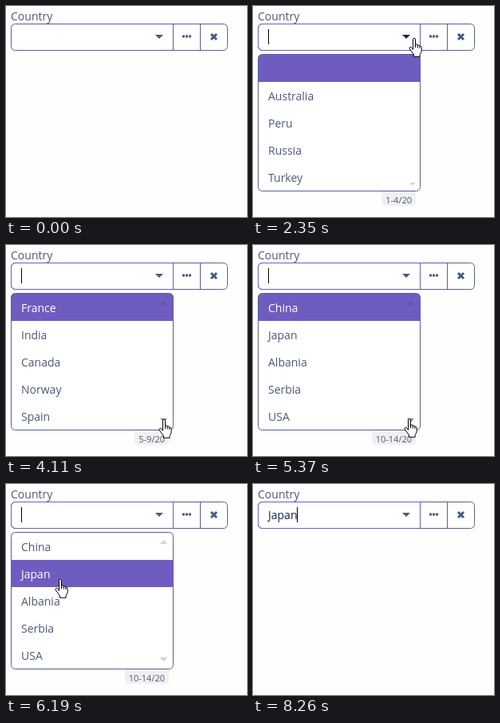
An HTML page with a canvas that plays this animation: 302x264 px, repeating every 8.51 s.

```html
<!DOCTYPE html>
<html lang="en">
<head>
<meta charset="utf-8">
<title>Country picker</title>
<style>
html, body { margin: 0; width: 302px; height: 264px; overflow: hidden; background: #fefefe; }
canvas { display: block; }
</style>
</head>
<body>
<canvas id="stage" width="302" height="264"></canvas>
<script>
const ctx = document.getElementById('stage').getContext('2d');
const LOOP = 8510;
const INK = '#4a5a7a', BORDER = '#53638f', PURPLE = '#6f5cc0', DARK = '#0f2a55';

const pages = [
  { items: ['', 'Australia', 'Peru', 'Russia', 'Turkey'], range: '1-4/20' },
  { items: ['France', 'India', 'Canada', 'Norway', 'Spain'], range: '5-9/20' },
  { items: ['China', 'Japan', 'Albania', 'Serbia', 'USA'], range: '10-14/20' }
];

// Step tracks: [start time, value...]
const pointer = [
  [0], [1500, 'arrow', 255, 77], [1650, 'arrow', 228, 56], [1780, 'arrow', 200, 36],
  [1930, 'hand', 207, 43], [2080, 'hand', 201, 40], [2620, 'hand', 201, 52],
  [2740, 'hand', 200, 73], [2890, 'hand', 201, 120], [3010, 'hand', 204, 201],
  [3130, 'arrow', 212, 196], [3280, 'hand', 205, 217], [3400, 'hand', 192, 208],
  [3560, 'hand', 197, 218], [5370, 'hand', 195, 217], [5520, 'hand', 150, 180],
  [5640, 'hand', 90, 140], [5760, 'hand', 69, 121], [5910, 'hand', 67, 119],
  [6500, 'arrow', 67, 119], [7210, 'arrow', 70, 120], [7330, 'arrow', 82, 125],
  [7450, 'arrow', 100, 134], [7600, 'arrow', 132, 147], [7720, 'arrow', 164, 160],
  [7870, 'arrow', 206, 187], [7990, 'arrow', 240, 220], [8110, 'arrow', 257, 240], [8260]
];
const activeRow = [[0, 0], [2890, 1], [3010, 3], [3280, 4], [4110, 0], [5520, 3], [5640, 2], [5760, 1]];
const pageTrack = [[0, 0], [4110, 1], [4970, 2]];
const blinks = [2080, 2620, 3130, 3710, 4110, 4690, 5250, 5760, 6190, 6780, 7210, 7720, 8260];

const at = (track, t) => track.findLast(step => step[0] <= t).slice(1);

const handShape = new Path2D('M5.5 1.5q0-1 1.5-1t1.5 1V8q2.5-.6 2.7 1 2.4-.4 2.6 1.2 2.4-.2 2.4 1.6v4q0 2.5-2 4.5v3H6.5v-2.5L1.5 14q-1.4-2 .3-2.6 1.2-.4 2.2 1l1.5 2z');
const knuckles = new Path2D('M8.5 8v4M11.2 9v3.5M13.8 10.5v2.5');
const arrowShape = new Path2D('M.5.5V17l4-3.8 2.7 5.6 2.3-1-2.7-5.5h4.9z');

function text(str, x, y, color, size = 14, align = 'left') {
  ctx.font = `${size}px "Open Sans", sans-serif`;
  ctx.textAlign = align;
  ctx.fillStyle = color;
  ctx.fillText(str, x, y);
}

function rect(x, y, w, h, color) {
  ctx.fillStyle = color;
  ctx.fillRect(x, y, w, h);
}

function box(x, y, w, h, radii, fill, stroke) {
  ctx.beginPath();
  ctx.roundRect(x, y, w, h, radii);
  if (fill) { ctx.fillStyle = fill; ctx.fill(); }
  if (stroke) { ctx.strokeStyle = stroke; ctx.lineWidth = 1; ctx.stroke(); }
}

// Triangle with a flat base at y, pointing by h (negative is up)
function triangle(x, y, halfWidth, h, color) {
  ctx.beginPath();
  ctx.moveTo(x - halfWidth, y);
  ctx.lineTo(x + halfWidth, y);
  ctx.lineTo(x, y + h);
  ctx.fillStyle = color;
  ctx.fill();
}

function drawField(t) {
  text('Country', 6, 18, INK);
  box(6.5, 22.5, 271, 33, 5, '#fff', BORDER);
  rect(209, 23, 1, 32, BORDER);
  rect(243, 23, 1, 32, BORDER);
  if (t >= 2080) box(6.5, 22.5, 203, 33, [5, 0, 0, 5], null, PURPLE);

  triangle(192, 36, 5, 5, t >= 1930 && t < 2740 ? DARK : '#455b80');
  for (const x of [221, 225, 229]) rect(x, 36.5, 3, 3, '#455b80');
  ctx.beginPath();
  ctx.moveTo(257, 35); ctx.lineTo(264, 42);
  ctx.moveTo(264, 35); ctx.lineTo(257, 42);
  ctx.strokeStyle = '#455b80';
  ctx.lineWidth = 3;
  ctx.stroke();

  const chosen = t >= 6500;
  if (chosen) text('Japan', 19, 44, '#14254d');
  if (blinks.filter(b => b <= t).length % 2) rect(chosen ? 55 : 19, 29, 1, 19, '#000');
}

function drawList(t) {
  if (t < 2200 || t >= 6500) return;
  const [pageIndex] = at(pageTrack, t), [active] = at(activeRow, t);
  const { items, range } = pages[pageIndex];
  const opening = t < 2350;

  if (!opening) {
    ctx.font = '11px "Open Sans", sans-serif';
    const w = Math.round(ctx.measureText(range).width) + 10;
    box(204 - w, 230, w, 20, 4, '#f0f0f0');
    text(range, 199, 247, INK, 11, 'right');
  }

  ctx.save();
  if (opening) {
    ctx.globalAlpha = 0.7;
    ctx.translate(0, -2);
  }
  box(6.5, 60.5, 203, 171, 5, '#fff');
  ctx.save();
  ctx.clip();
  rect(6, 61 + active * 34, 204, 34, PURPLE);
  ctx.restore();
  box(6.5, 60.5, 203, 171, 5, null, BORDER);
  if (active) rect(6, 61 + active * 34, 204, 34, PURPLE);
  items.forEach((name, i) => text(name, 19, 84 + i * 34, i === active ? '#fff' : INK));

  if (pageIndex) triangle(197.5, 75, 4.5, -5, active ? '#d2d2d2' : '#6652b3');
  const pressed = t >= 3280 && t < 5520;
  if (t < 2470) triangle(200, 221, 3.5, 4, '#d2d2d2');
  else triangle(197.5, 217, 4.5, 5, pressed ? '#8d8da8' : '#d2d2d2');
  ctx.restore();
}

function drawPointer(t) {
  const [kind, x, y] = at(pointer, t);
  if (!kind) return;
  const hand = kind === 'hand', shape = hand ? handShape : arrowShape;
  ctx.save();
  ctx.translate(hand ? x - 6 : x, y);
  ctx.fillStyle = '#fff';
  ctx.strokeStyle = '#000';
  ctx.lineWidth = 1;
  ctx.fill(shape);
  ctx.stroke(shape);
  if (hand) ctx.stroke(knuckles);
  ctx.restore();
}

function frame() {
  const t = performance.now() % LOOP;
  rect(0, 0, 302, 264, '#fefefe');
  drawField(t);
  drawList(t);
  drawPointer(t);
  requestAnimationFrame(frame);
}
frame();
</script>
</body>
</html>
```
